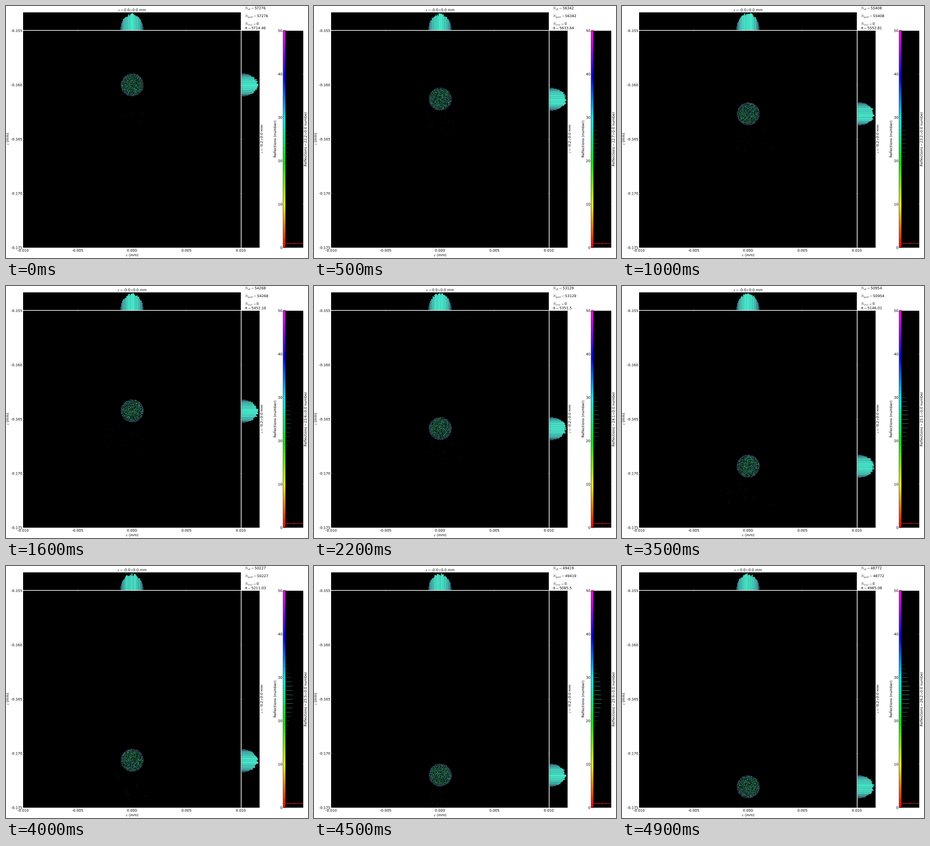
These frames come from a looping animation (512x428 px, 5 s). A matplotlib script:

```python
import numpy as np
import matplotlib.pyplot as plt
from matplotlib.animation import FuncAnimation
from matplotlib.collections import LineCollection
from matplotlib.colors import hsv_to_rgb
from matplotlib.patches import PathPatch, Rectangle
from matplotlib.path import Path
from matplotlib.textpath import TextPath

W, H, DPI = 512, 428, 100
PX = 72 / DPI  # points per pixel
FRAMES, INTERVAL = 50, 100
TOP, BOTTOM, LEFT, RIGHT = 42.0, 410.5, 29.0, 398.1
CX, RADIUS, BIN, CELLS = 213.5, 19.6, 1.44, 40
FONT_SIZE = 6

plt.rcParams.update({"font.family": "DejaVu Sans", "mathtext.fontset": "cm"})

# Readings along the loop: step, rays, flux, mean number of reflections
STEPS = [0, 10, 22, 28, 35, 40, 49]
RAYS = [57276, 55408, 53129, 52283, 50954, 50227, 48772]
FLUX = [5714.46, 5552.81, 5351.5, 5220.14, 5146.01, 5211.03, 4985.08]
MEAN = [22.2, 23.2, 24.1, 24.6, 25.1, 25.5, 26.2]

fig = plt.figure(figsize=(W / DPI, H / DPI), dpi=DPI, facecolor="white")
ax = fig.add_axes([0, 0, 1, 1])
ax.axis("off")


class Label:
    """Outline text, placed to a fraction of a pixel; (x, y) lies on the baseline."""

    def __init__(self, x, y, text="", align=0.5, upright=False):
        self.x, self.y, self.align, self.upright = x, y, align, upright
        self.patch = ax.add_patch(PathPatch(Path([(0, 0)]), fc="black", lw=0, snap=False))
        if text:
            self.set_text(text)

    def set_text(self, text):
        glyphs = TextPath((0, 0), text, size=FONT_SIZE)
        box = glyphs.get_extents()
        along = glyphs.vertices[:, 0] - box.x0 - self.align * box.width
        up = glyphs.vertices[:, 1]
        if self.upright:
            points = np.column_stack([self.x - up, self.y - along])
        else:
            points = np.column_stack([self.x + along, self.y - up])
        self.patch.set_path(Path(points, glyphs.codes))


def panel(x0, y0, x1, y1):
    ax.add_patch(Rectangle((x0, y0), x1 - x0, y1 - y0, fc="black", lw=0, snap=False))


def bars(width):
    lines = LineCollection([], linewidths=width * PX, capstyle="butt", snap=False)
    ax.add_collection(lines, autolim=False)
    return lines


def level(number):
    return BOTTOM - (BOTTOM - TOP) * number / 50


panel(LEFT, TOP, RIGHT, BOTTOM)
panel(LEFT, 10.8, RIGHT, 40.9)
panel(399.3, TOP, 429.9, BOTTOM)
panel(469.8, TOP, 504, BOTTOM)

hues = np.linspace(0.85, 0, 370)
rainbow = hsv_to_rgb(np.stack([hues, np.ones(370), np.ones(370)], axis=1))[:, None]
ax.imshow(rainbow, extent=(470, 474, BOTTOM, TOP), aspect="auto", zorder=2)
ax.add_patch(Rectangle((470, TOP), 3.9, BOTTOM - TOP, fill=False, ec="black",
                       lw=0.5 * PX, snap=False, zorder=2.5))

# Axis labels and faint inward ticks
xs, ys = np.linspace(LEFT, RIGHT, 5), np.linspace(TOP, BOTTOM, 5)
ticks = []
for i, (x, y) in enumerate(zip(xs, ys)):
    Label(x, 417.2, f"{-0.010 + 0.005 * i:.3f}".replace("-0.000", "0.000"))
    Label(27.2, y + 2.1, f"{-0.155 - 0.005 * i:.3f}", align=1)
    ticks += [[(x, end), (x, end + d)] for end, d in
              ((TOP, 2), (BOTTOM, -2), (10.8, 2), (40.9, -2))]
    ticks += [[(end, y), (end + d, y)] for end, d in
              ((LEFT, 2), (RIGHT, -2), (399.3, 2), (429.9, -2))]
for number in range(0, 51, 10):
    Label(468.3, level(number) + 2.1, str(number), align=1)
    ticks.append([(502, level(number)), (504, level(number))])
ax.add_collection(LineCollection(ticks, colors="#808080", linewidths=0.3 * PX, snap=False))

Label(CX, 425, "$x$ (mm)")
Label(4.6, 226, "$z$ (mm)", upright=True)
Label(458, 226, "Reflections (number)", upright=True)
Label(435.3, 226, r"$z=$-0.2$\pm$0.0 mm", upright=True)

title = Label(CX, 8.8)
mean_text = Label(509.6, 226, upright=True)
readouts = [Label(405.3, y, align=0) for y in (5.7, 19, 32.2, 39.5)]

strays = ax.scatter([], [], s=0.6, c="#202828", lw=0)
speckle = ax.imshow(np.zeros((CELLS, CELLS, 4)), extent=(0, 1, 1, 0), aspect="auto",
                    interpolation="nearest", zorder=2)
top_bars, side_bars = bars(1.75), bars(1.75)
spectrum = bars(0.9)

red = dict(color="#d8281c", snap=False)
ax.plot([474, 503.7], [level(1)] * 2, lw=0.9 * PX, **red)
ax.plot([488.5] * 2, [level(1) - 1.6, level(1) + 1.6], lw=0.5 * PX, **red)
ax.plot([474, 478], [level(2)] * 2, lw=0.8 * PX, color="#30180a", snap=False)
ax.set(xlim=(0, W), ylim=(H, 0))
ax.autoscale(False)


def speckle_colors(rng):
    axis = np.linspace(-1, 1, CELLS)
    radius = np.hypot(axis[:, None], axis)
    rim = radius > 0.9
    hue = np.where(rim, rng.uniform(0.5, 0.75, rim.shape), rng.uniform(0.3, 0.58, rim.shape))
    sat = np.where(rim, 0.45, 0.65)
    value = 0.1 + 0.45 * rng.random(rim.shape) ** 1.5
    alpha = np.clip((1.02 - radius) * 20, 0, 1)
    return np.dstack([hsv_to_rgb(np.dstack([hue, sat, value])), alpha])


def dome(rng):
    """Offsets, heights and colours of the projected disc's histogram."""
    u = np.arange(-13, 14) / 13.4
    shape = np.sqrt(1 - u ** 2)
    height = shape * rng.uniform(0.85, 1, u.size)
    height /= height.max()
    hue = 0.47 + 0.11 * (1 - shape) ** 1.3
    colors = hsv_to_rgb(np.stack([hue, 0.45 + 0.24 * shape, 0.22 + 0.72 * height], axis=1))
    return u * 13.4 * BIN, 28.5 * height, colors


def update(n):
    rng = np.random.default_rng(100 + n)
    cy = 134 + 4.918 * n
    speckle.set_extent((CX - RADIUS, CX + RADIUS, cy + RADIUS, cy - RADIUS))
    speckle.set_data(speckle_colors(rng))
    dots = np.column_stack([rng.normal(CX, 18, 10), cy + rng.uniform(24, 65, 10)])
    strays.set_offsets(dots[dots[:, 1] < BOTTOM - 1])

    offset, height, colors = dome(rng)
    top_bars.set_segments([[(CX + o, 40.9), (CX + o, 40.9 - h)] for o, h in zip(offset, height)])
    top_bars.set_color(colors)
    offset, height, colors = dome(rng)
    side_bars.set_segments([[(399.5, cy + o), (399.5 + h, cy + o)] for o, h in zip(offset, height)])
    side_bars.set_color(colors)

    t = n / (FRAMES - 1)
    number = np.arange(13, 40)
    bell = np.exp(-0.5 * ((number - 23.7 - 2.1 * t) / (4.5 + 0.5 * t)) ** 2)
    length = (6 + 8.5 * t) * bell * rng.uniform(0.93, 1.03, number.size)
    spectrum.set_segments([[(474, level(k)), (474 + s, level(k))] for k, s in zip(number, length)])
    value = 0.03 + 0.036 * length
    spectrum.set_color(hsv_to_rgb(np.stack([0.017 * number, 0.75 + 0 * value, value], axis=1)))

    rays = round(np.interp(n, STEPS, RAYS))
    flux = np.interp(n, STEPS, FLUX)
    sign = "-" if n and n % 5 < 2 else ""
    title.set_text(rf"$x=${sign}0.0$\pm$0.0 mm")
    mean_text.set_text(rf"Reflections$=${np.interp(n, STEPS, MEAN):.1f}$\pm$0.0 number")
    lines = (rf"$N_{{\mathrm{{all}}}}=${rays}", rf"$N_{{\mathrm{{good}}}}=${rays}",
             r"$N_{\mathrm{over}}=$0", rf"$\Phi=${flux:.6g}")
    for text, line in zip(readouts, lines):
        text.set_text(line)
    return []


anim = FuncAnimation(fig, update, frames=FRAMES, interval=INTERVAL, repeat=True, repeat_delay=0)
plt.show()
```
